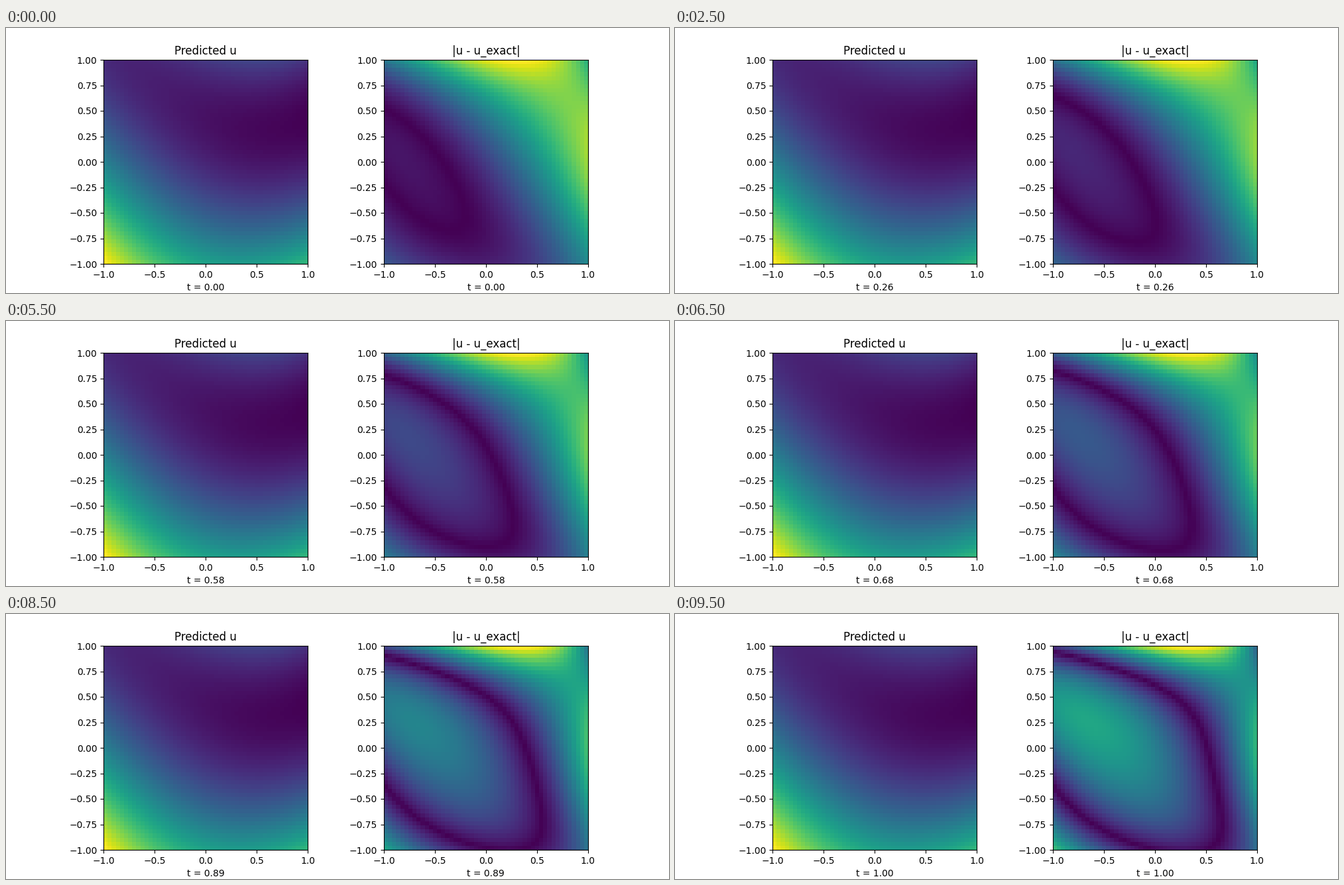
A matplotlib script for the animation above (10000 ms loop, 1000 by 400 pixels).

```python
import numpy as np
import matplotlib.pyplot as plt
from matplotlib.animation import FuncAnimation

FRAMES = 20
CELLS = 50

axis = np.linspace(-1, 1, CELLS)
x, y = np.meshgrid(axis, axis)


def predicted():
    """A valley that tilts from a steep slope on the left to a bowl on the right."""
    level = 0.10 - 0.16 * x + 0.15 * x**2 - 0.025 * x**3
    slope = -0.205 + 0.15 * x - 0.147 * x**2 - 0.057 * x**3
    bend = 0.265 + 0.135 * x - 0.035 * x**2 - 0.033 * x**3
    return level + slope * y + bend * y**2 - 0.05 * y * (1 - y**2)


def start_error():
    """Signed error at t = 0, as a polynomial in y for each x."""
    level = 0.185 + 0.54 * x + 0.23 * x**2 - 0.083 * x**3
    slope = 0.38 + 0.285 * x - 0.36 * x**2 - 0.14 * x**3
    bend = 0.24 - 0.335 * x - 0.30 * x**2
    twist = 0.06 - 0.13 * x
    return level + slope * y + bend * y**2 + twist * y**3 + 0.1 * y**4


def growth():
    """Rate at which the exact solution rises: a smooth ridge along x + y."""
    return 0.645 * np.exp(-(x + y - 1.3) ** 2 / 2.75)


def error_at(t):
    return np.abs(start_error() - t * growth())


def add_panel(ax, data, title):
    ax.set_title(title)
    return ax.imshow(data, extent=[-1, 1, -1, 1], origin="lower",
                     cmap="viridis")


fig, axes = plt.subplots(1, 2, figsize=(10, 4), dpi=100)
add_panel(axes[0], predicted(), "Predicted u")
error_image = add_panel(axes[1], error_at(0), "|u - u_exact|")


def update(frame):
    t = frame / (FRAMES - 1)
    error = error_at(t)
    error_image.set_data(error)
    error_image.set_clim(error.min(), error.max())
    for ax in axes:
        ax.set_xlabel(f"t = {t:.2f}")
    return [error_image]


anim = FuncAnimation(fig, update, frames=FRAMES, interval=500, repeat=True)
plt.show()
```
